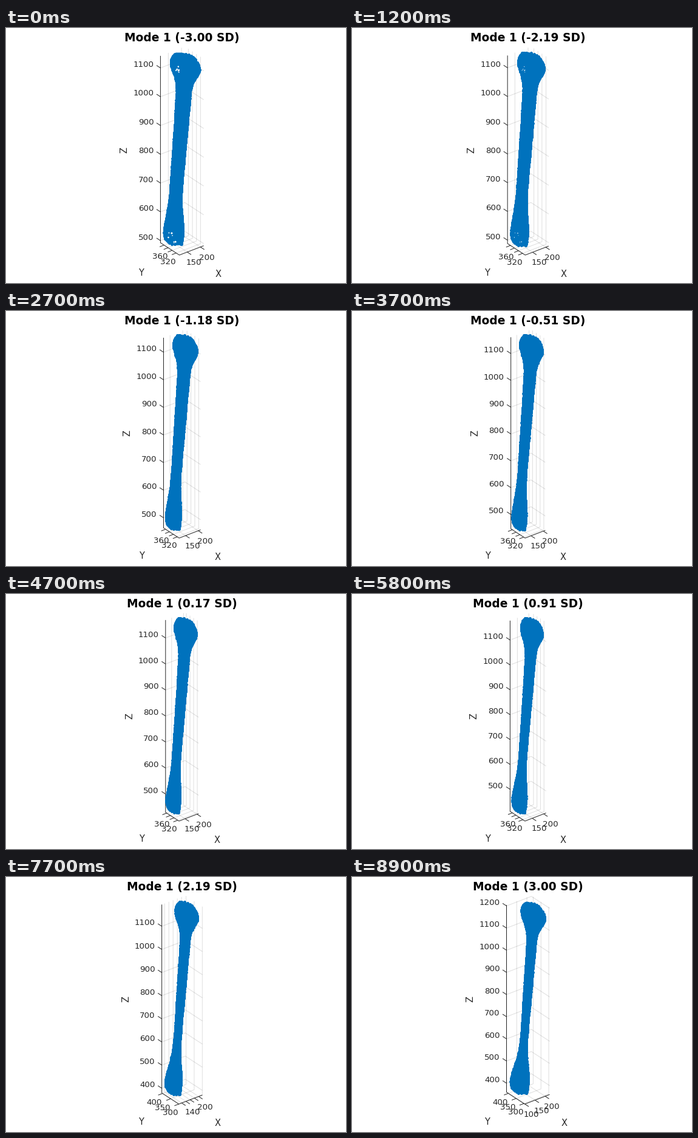
Animation of 560 by 420 pixels, one loop 9 s. Source, as a matplotlib script:

```python
import numpy as np
import matplotlib.pyplot as plt
from matplotlib.animation import FuncAnimation
from matplotlib.collections import LineCollection

W, H, DPI, FRAMES = 560, 420, 100, 90
PT = 72 / DPI
INK, BLUE = "#262626", "#0072BD"
plt.rcParams["font.family"] = "DejaVu Sans"

# Unit screen vectors for azimuth -37.5, elevation 30
AZ, EL = np.radians(37.5), np.radians(30)
XR, YR = np.cos(AZ), np.sin(AZ)
XU, YU, ZU = YR * np.sin(EL), XR * np.sin(EL), np.cos(EL)
TOP, BOTTOM, MID = 30.5, 374.0, 290.0
TICK = 7.7

rng = np.random.default_rng(4)
depth = np.linspace(0, 1, 170)
inset = 2.2 + rng.uniform(0, 0.6, (2, depth.size))
# Gaps between sparse points, near the head and the foot
gap_x = np.r_[rng.uniform(279, 290, 7), rng.uniform(266, 282, 7)]
gap_y = np.r_[rng.uniform(59, 74, 7), rng.uniform(337, 354, 7)]
gap_d = rng.uniform(1.5, 3.2, 14)


def limits(sd):
    """Each point moves linearly with sd, so limits are envelopes of lines."""
    return (min(127 + 2.3 * sd, 126 - 8.8 * sd),
            max(207 - 1.8 * sd, 205.5 + 5.5 * sd),
            min(314 + 3.2 * sd, 314 - 6.5 * sd),
            max(386 - 3.9 * sd, 385 + 8.9 * sd),
            min(516.6 + 8 * sd, 434 - 24.8 * sd),
            max(1145 + sd, 1167 + 12.3 * sd))


def bump(u, at, width):
    return np.exp(-((u - at) / width) ** 2)


def outline(u, sd):
    """Left edge, right edge and height: tapered shaft plus head and foot."""
    q = sd * sd
    centre, half = 298 - 24.8 * u, 11 - 4.5 * u
    foot, cap = bump(u, 0.95, 0.13), np.exp(-u / 0.013)
    left = (centre - half + 1.25 * sd
            - (11 + 0.25 * q) * bump(u, 0.045, 0.08)
            - (7 + 0.37 * (q + 3 * sd)) * foot
            + 5 * cap + 18 * np.exp((u - 1) / 0.02))
    right = (centre + half + 0.25 * q - 0.2 * sd
             + (9 + 0.3 * q) * bump(u, 0.09, 0.055)
             + (7 + 0.25 * q) * foot - 22 * cap)
    top, bottom = 38 + 0.28 * q, 362 - 0.47 * q
    return left, right, top + u * (bottom - top)


def ticks(lo, hi, step):
    return np.arange(np.ceil(lo / step), np.floor(hi / step) + 1) * step


def label(x, y, s, px, ha="center", **kw):
    kw = {"color": INK, "va": "baseline", **kw}
    ax.text(x, y, s, fontsize=px * PT, ha=ha, **kw)


def draw_axes(sd):
    x0, x1, y0, y1, z0, z1 = limits(sd)
    s = (BOTTOM - TOP) / (XU * (x1 - x0) + YU * (y1 - y0) + ZU * (z1 - z0))
    width = s * (XR * (x1 - x0) + YR * (y1 - y0))
    left = MID - width / 2

    def proj(x, y, z=z0):
        return np.array([
            left + s * (XR * (x - x0) + YR * (y1 - y)),
            BOTTOM - s * (XU * (x - x0) + YU * (y - y0) + ZU * (z - z0))])

    xstep = 20 if x1 - x0 > 100 and x0 > 100 else 50
    ystep = 50 if y0 <= 300 and y1 >= 400 else 20
    out_x = TICK * np.array([-XR, XU]) / np.hypot(XR, XU)
    out_y = TICK * np.array([YR, YU]) / np.hypot(YR, YU)
    grid = []
    lines = [[proj(x0, y1, z1), proj(x0, y1), proj(x0, y0), proj(x1, y0)]]

    for x in ticks(x0, x1, xstep):
        p = proj(x, y0)
        grid.append([p, proj(x, y1), proj(x, y1, z1)])
        lines.append([p, p + out_y])
        if xstep == 50 or x % 60 == 20:
            label(p[0] + 11, p[1] + 21, f"{x:.0f}", 13.33)
    for y in ticks(y0, y1, ystep):
        p = proj(x0, y)
        grid.append([p, proj(x1, y), proj(x1, y, z1)])
        lines.append([p, p + out_x])
        if ystep == 50 or y % 40 == 0:
            label(p[0] - 13.6, p[1] + 18.4, f"{y:.0f}", 13.33)
    for z in ticks(z0, z1, 100):
        p = proj(x0, y1, z)
        grid.append([p, proj(x1, y1, z), proj(x1, y0, z)])
        lines.append([p, p - out_y])
        label(p[0] - 11, p[1] - 1.7, f"{z:.0f}", 13.33, ha="right")

    ax.add_collection(LineCollection(grid, colors=[(0.15, 0.15, 0.15, 0.15)],
                                     linewidths=PT, zorder=1))
    ax.add_collection(LineCollection(lines, colors=INK, linewidths=PT, zorder=2))
    label(347.5 + (width - 54) * 0.1, 409.5, "X", 14.67)
    label(223.5 - (width - 54) * 0.07, 408.5, "Y", 14.67)
    label(left - 59.2, 201, "Z", 14.67, rotation=90, va="center")


def draw_bone(sd):
    left, right, y = outline(depth, sd)
    ax.fill(np.r_[left + 1.2, right[::-1] - 1.2], np.r_[y, y[::-1]],
            color=BLUE, lw=0, zorder=3)
    dot_y = np.clip(y, y[0] + 2, y[-1] - 2)
    ax.scatter(np.r_[left + inset[0], right - inset[1]], np.r_[dot_y, dot_y],
               s=(5 * PT) ** 2, color=BLUE, lw=0, zorder=4)
    gap = np.clip((-1.4 - sd) / 1.6, 0, 1)
    if gap > 0:
        ax.scatter(gap_x, gap_y, s=(gap_d * gap * PT) ** 2, color="white",
                   lw=0, zorder=5)


def update(i):
    sd = -3 + 6 * i / (FRAMES - 1)
    ax.clear()
    ax.set(xlim=(0, W), ylim=(H, 0))
    ax.axis("off")
    draw_axes(sd)
    draw_bone(sd)
    label(MID, 22.4, f"Mode 1 ({sd:.2f} SD)", 18.67, color="black",
          weight="bold")
    return []


fig = plt.figure(figsize=(W / DPI, H / DPI), dpi=DPI, facecolor="white")
ax = fig.add_axes([0, 0, 1, 1])
anim = FuncAnimation(fig, update, frames=FRAMES, interval=100, repeat=True,
                     repeat_delay=0)
plt.show()
```
